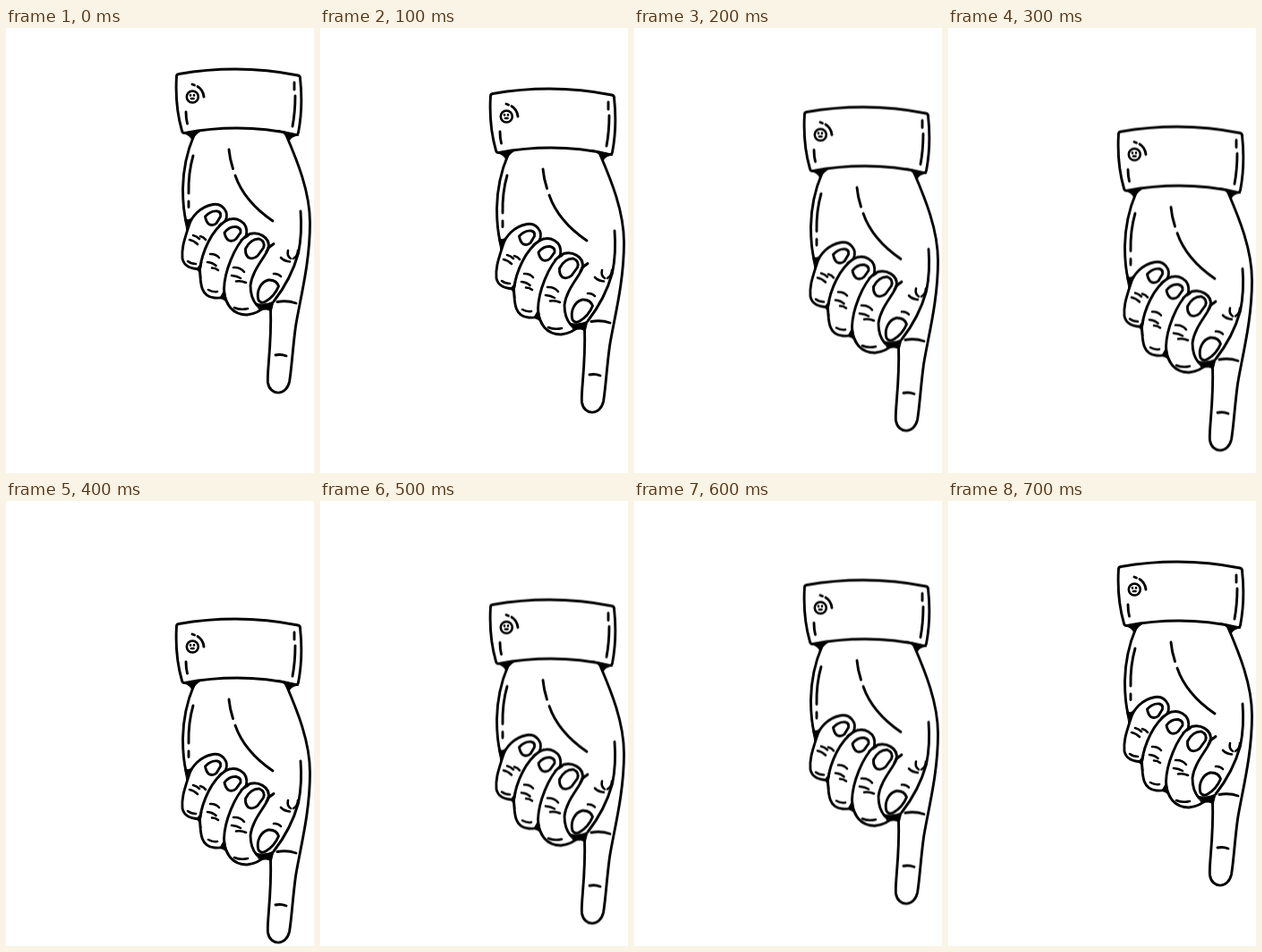
An HTML page for the animation above (800 ms loop, 344 px wide and 498 px high).

```html
<!DOCTYPE html>
<html lang="en">
<head>
<meta charset="utf-8">
<title>Pointing hand</title>
<style>
html, body { margin: 0; width: 100%; height: 100%; overflow: hidden; background: #fff; }
svg { display: block; width: 100vw; height: 100vh; }
.hand {
  fill: none; stroke: #000; stroke-width: 2.9;
  stroke-linecap: round; stroke-linejoin: round;
  animation: bob 800ms step-end infinite;
}
.ink { fill: #000; stroke-width: 1; }
.thin { stroke-width: 2.6; }
@keyframes bob {
  0%, 100% { transform: translateY(0); }
  12.5%, 87.5% { transform: translateY(22px); }
  25%, 75% { transform: translateY(42.5px); }
  37.5%, 62.5% { transform: translateY(64.5px); }
  50% { transform: translateY(86px); }
}
</style>
</head>
<body>
<svg viewBox="0 0 344 498">
  <g class="hand">
    <!-- cuff -->
    <path d="M193 51.500Q224 46 256 46Q292 46 326 53Q328.500 53.500 328.500 56Q332 88 326.500 117Q326 120 323 119.300Q291 112 258 112Q228 112 200 117.500Q197 118 196.500 115Q188.500 87 190.500 54Q190.500 52 193 51.500Z"/>
    <path d="M322 61V69M323 76Q323 94 320 110M201 94Q201 101 202.500 107M208 63L210.500 64M214 65.500Q220 69 221 77"/>
    <circle class="thin" cx="208.300" cy="77" r="6.500"/>
    <path class="thin" d="M206 75V75.500M210 75V75.500M207 79L209.500 79"/>

    <!-- palm and index finger -->
    <path d="M210 120Q198 148 197.500 180Q197.500 203 201.500 218M313 120C325 148 339.500 183 339.500 218C339.500 264 328 305 323.500 334C320 360 319 382 316.500 396C313 412 295 412 292.500 397C291 386 297 355 295.500 314"/>
    <path d="M209 143Q203.500 162 204 185M204 194V200.500M249 136Q250 147 253.500 157.500M256 165Q266 194 298 216"/>
    <path d="M303 306.500Q314 304.500 324 308M301 366Q307 364.500 313 367"/>

    <!-- little finger -->
    <path d="M245 216C250 205 241 196 231 197.500C217 200 207 211 204 222C199 238 196 246 197 258C199 267 206 269 216 270"/>
    <path d="M222.500 211C226 207 231 204.500 236 205Q240.500 206 239.500 211L235 218.500Q231 222 226.500 219.500Q223.500 217 222.500 211Z"/>
    <path class="thin" d="M205 237Q210 238 214 242M209 232Q213 233 216 236M217 233Q221 234 223 237M203 261Q207 264 212 264"/>

    <!-- ring finger -->
    <path d="M245 216C230 226 219 250 216.500 270C217 287 218 301 233 302Q240 302.500 244 301M245 216C256 210 271 216 268.500 232"/>
    <path d="M244 229C247 225 252 222 257 222.500Q263 224 262 229L257 236Q253 239.500 248.500 237.500Q245 235 244 229Z"/>
    <path class="thin" d="M228 253Q234 252.500 238 257M225 262Q231 262.500 234.500 266M230 268.500Q234 268.500 237 271M226 293Q231 296 236 295"/>

    <!-- middle finger -->
    <path d="M268.500 232C255 244 244 273 243.500 292C244 310 254 321 269 321Q281 320 290 311M268.500 232C281 226 296 234 293 247C289 257 275 271 273 288Q273 302 280 310"/>
    <path d="M267.500 247C271 240 277 235.500 283 236Q290 239 287.500 246L281 255Q276 259.500 271 257Q267 254 267.500 247Z"/>
    <path class="thin" d="M254 268Q262 267.500 266 273M252 277Q258 277.500 262 280M257 283.500Q263 282.500 268 285M255 313Q262 316 270 314"/>

    <!-- thumb -->
    <path d="M329 205Q331 230 326.500 252C321 272 313 288 299 306M293 246L299 241.500"/>
    <path d="M282 304.500C279 294 285 284 293 282Q302 281.500 304.500 289Q300 300 290 306Q285 309 282 304.500Z"/>
    <path class="thin" d="M326 249Q326 255 321 258M315 249Q313.500 255 318 258M307 257Q311 261 317 261.500M299 275Q304 274.500 307 278"/>

    <!-- heavy joints -->
    <g class="ink">
      <path d="M199 118L220 114Q211 118 208 126Q206 120 199 118Z"/>
      <path d="M304 114.500L327 120Q318 121 316 127Q313 118 304 114.500Z"/>
      <path d="M199.500 213Q203 217 208 212Q204 218 202 226Z"/>
      <path d="M238 220Q244 215 250 213Q245 218 238 220Z"/>
      <path d="M262 237Q268 232 274 230Q269 236 262 237Z"/>
      <path d="M213 269.500L219 262Q216 270 218 280Q216 272 213 269.500Z"/>
      <path d="M239 302L244 293Q245 303 249 309Q245 304 239 302Z"/>
      <path d="M290 250L293 244L300 241.500Q295 246 290 250Z"/>
      <path d="M278 308Q288 311 299 306L296 318Q293 313 284 316Z"/>
    </g>
  </g>
</svg>
</body>
</html>
```
